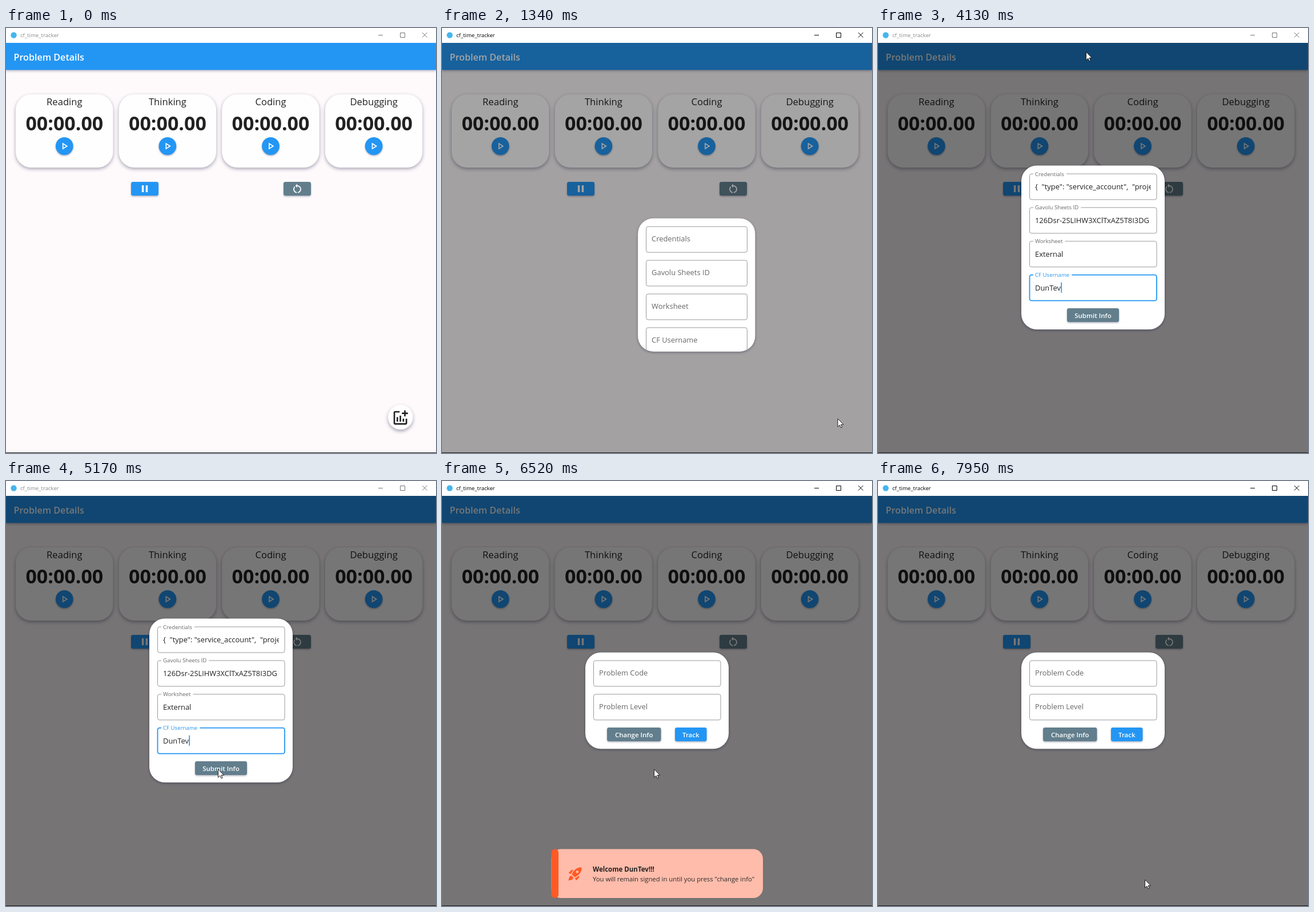
An HTML page with a canvas that plays this animation: 753 by 743 pixels, repeating every 8 s.

```html
<!DOCTYPE html>
<html lang="en">
<head>
<meta charset="utf-8">
<title>cf_time_tracker</title>
<style>
html, body { margin: 0; width: 100%; height: 100%; overflow: hidden; background: #fefafc; }
canvas { display: block; width: 753px; height: 743px; }
</style>
</head>
<body>
<canvas id="stage"></canvas>
<script>
const W = 753, H = 743, LOOP = 8000;
const FONT = '"Open Sans", "Noto Sans", sans-serif';
const BLUE = '#2396f4', SLATE = '#627e8c', ORANGE = '#ff5a26', INK = '#212121';

// Key moments in ms
const T = {
  enter: 430, reach: 950, click: 1140, open: 1190, leave: 1650, atField: 2480,
  filled: 2820, back: 3910, submit: 5340, toast: 5440, swap: 5640,
  toastFade: 6780, flick: 7800
};

const canvas = document.getElementById('stage');
const ctx = canvas.getContext('2d');
const dpr = window.devicePixelRatio || 1;
canvas.width = W * dpr;
canvas.height = H * dpr;

const icons = {
  play: new Path2D('M10 8.64L15.27 12 10 15.36V8.64M8 5v14l11-7L8 5z'),
  pause: new Path2D('M6 19h4V5H6v14zm8-14v14h4V5h-4z'),
  restart: new Path2D('M12 5V2L8 6l4 4V7c3.31 0 6 2.69 6 6 0 2.97-2.17 5.43-5 5.91v2.02c3.95-.49 7-3.85 7-7.93 0-4.42-3.58-8-8-8zm-6 8c0-1.65.67-3.15 1.76-4.24L6.34 7.34C4.9 8.79 4 10.79 4 13c0 4.08 3.05 7.44 7 7.93v-2.02c-2.83-.48-5-2.94-5-5.91z'),
  chart: new Path2D('M22 5v2h-3v3h-2V7h-3V5h3V2h2v3h3zm-3 14H5V5h6V3H5c-1.1 0-2 .9-2 2v14c0 1.1.9 2 2 2h14c1.1 0 2-.9 2-2v-6h-2v6zm-4-6v4h2v-4h-2zm-4 4h2V9h-2v8zm-2 0v-6H7v6h2z'),
  rocket: new Path2D('M9.2 6.35c-2 2.3-3.4 5.6-3.6 5.9L2 10.7l4-4c.5-.5 1.2-.7 1.9-.6zM11.2 17s3.7-1.5 5.9-3.7c5.4-5.4 4.5-9.6 4.2-10.6-.9-.3-5.2-1.2-10.6 4.2C8.5 9.1 7 12.8 7 12.8zm6.4-2.2c-2.3 2-5.6 3.5-5.9 3.6L13.3 22l4-4c.5-.5.7-1.2.6-1.9zM9 18c0 .8-.3 1.6-.9 2.1C6.9 21.3 2 22 2 22s.7-4.9 1.9-6.1A3 3 0 019 18zm4-9a2 2 0 104 0 2 2 0 10-4 0z'),
  arrow: new Path2D('M0 0V17L4 13.2 6.6 19 9.2 17.9 6.6 12.2H12z')
};

const clamp = v => Math.min(1, Math.max(0, v));
const prog = (t, start, dur) => clamp((t - start) / dur);
const lerp = (a, b, k) => a + (b - a) * k;
const mix = (a, b, k) => a.map((v, i) => lerp(v, b[i], k));
const inOut = k => k * k * (3 - 2 * k);

// cubic-bezier(.4, 0, .2, 1)
function standard(x) {
  let lo = 0, hi = 1, s = x;
  for (let i = 0; i < 24; i++) {
    s = (lo + hi) / 2;
    const bx = 1.2 * s * (1 - s) ** 2 + 0.6 * s * s * (1 - s) + s ** 3;
    if (bx < x) lo = s; else hi = s;
  }
  return 3 * s * s * (1 - s) + s ** 3;
}

function text(str, x, y, size, color, weight = 400, align = 'left') {
  ctx.font = `${weight} ${size}px ${FONT}`;
  ctx.textAlign = align;
  ctx.fillStyle = color;
  ctx.fillText(str, x, y);
}

function shadow(dy, blur, alpha) {
  ctx.shadowColor = `rgba(25,25,60,${alpha})`;
  ctx.shadowOffsetY = dy * dpr;
  ctx.shadowBlur = blur * dpr;
}

function noShadow() {
  ctx.shadowColor = 'transparent';
}

function box(x, y, w, h, r, color) {
  ctx.beginPath();
  ctx.roundRect(x, y, w, h, r);
  ctx.fillStyle = color;
  ctx.fill();
}

function disc(x, y, r, color) {
  ctx.beginPath();
  ctx.arc(x, y, r, 0, Math.PI * 2);
  ctx.fillStyle = color;
  ctx.fill();
}

function icon(path, cx, cy, scale, color) {
  ctx.save();
  ctx.translate(cx - 12 * scale, cy - 12 * scale);
  ctx.scale(scale, scale);
  ctx.fillStyle = color;
  ctx.fill(path, 'evenodd');
  ctx.restore();
}

function button(x, y, w, color, label) {
  shadow(1.5, 3, 0.35);
  box(x, y, w, 24, 3.4, color);
  noShadow();
  if (label) text(label, x + w / 2, y + 17.2, 11.5, '#fff', 600, 'center');
}

function titleBar(active) {
  const tint = active ? '#000' : '#8a8a8a';
  ctx.fillStyle = '#fff';
  ctx.fillRect(0, 0, W, 26);
  disc(13.5, 12.5, 5.2, '#45b6ee');
  text('cf_time_tracker', 25, 16.3, 9.6, tint);
  ctx.strokeStyle = active ? '#000' : '#777';
  ctx.lineWidth = 1;
  ctx.beginPath();
  ctx.moveTo(652, 12.5);
  ctx.lineTo(660, 12.5);
  ctx.rect(690.5, 8.5, 8, 8);
  ctx.moveTo(729, 8);
  ctx.lineTo(737.5, 16.5);
  ctx.moveTo(737.5, 8);
  ctx.lineTo(729, 16.5);
  ctx.stroke();
}

function timerCard(name, i) {
  const x = 17 + i * 180.6, cx = x + 85.3;
  shadow(2.5, 6, 0.38);
  box(x, 116, 170.5, 128, 27, '#fffefe');
  noShadow();
  text(name, cx, 135, 16.6, INK, 400, 'center');
  text('00:00.00', cx, 179, 34, INK, 700, 'center');
  shadow(1.5, 3, 0.35);
  disc(cx, 206.5, 15.4, BLUE);
  noShadow();
  icon(icons.play, cx, 206.5, 0.86, '#fff');
}

function page(showFab) {
  ctx.fillStyle = '#fefafc';
  ctx.fillRect(0, 26, W, H - 26);
  shadow(2, 5, 0.4);
  ctx.fillStyle = BLUE;
  ctx.fillRect(0, 26, W, 47.3);
  noShadow();
  text('Problem Details', 13.6, 57, 16.1, '#fff', 600);
  ['Reading', 'Thinking', 'Coding', 'Debugging'].forEach(timerCard);
  button(219, 269, 48, BLUE);
  icon(icons.pause, 243, 281, 0.86, '#fff');
  button(486, 269, 48, SLATE);
  icon(icons.restart, 510, 281, 0.86, '#fff');
  if (showFab) {
    shadow(3, 6, 0.38);
    disc(690.8, 680.3, 21.8, '#fff');
    noShadow();
    icon(icons.chart, 690.6, 681.6, 1.32, INK);
  }
}

// lift: 0 = label inside the field, 1 = label on the border
function field(x, y, w, label, { lift = 0, value = '', focus = false, hover = false, caret = false } = {}) {
  ctx.lineWidth = focus ? 1.8 : 1;
  ctx.strokeStyle = focus ? BLUE : hover ? '#6c6c6c' : '#999';
  ctx.beginPath();
  ctx.roundRect(x + 0.5, y, w - 1, 45, 3.4);
  ctx.stroke();
  const size = 12.9 * (1 - 0.25 * lift);
  ctx.font = `400 12.9px ${FONT}`;
  const gap = (ctx.measureText(label).width * 0.75 + 7) * lift;
  ctx.fillStyle = '#fff';
  ctx.fillRect(x + 7, y - 2, gap, 4);
  text(label, x + 10, y + 26 - 22.5 * lift, size, focus ? BLUE : '#686868');
  if (!value) return;
  ctx.save();
  ctx.beginPath();
  ctx.rect(x + 9, y + 3, w - 19.5, 39);
  ctx.clip();
  text(value, x + 10, y + 27, 12.9, INK);
  if (caret) {
    ctx.fillStyle = BLUE;
    ctx.fillRect(x + 10.5 + ctx.measureText(value).width, y + 13, 1.7, 18);
  }
  ctx.restore();
}

function panel([x, y, w, h], content) {
  ctx.save();
  shadow(1.5, 4, 0.4);
  box(x, y, w, h, Math.min(27, w / 2, h / 2), '#fff');
  noShadow();
  ctx.clip();
  content(x, y, w);
  ctx.restore();
}

const inputs = [
  ['Credentials', '{  "type": "service_account",  "project_id"'],
  ['Gavolu Sheets ID', '126Dsr-2SLIHW3XClTxAZ5T8I3DG'],
  ['Worksheet', 'External'],
  ['CF Username', 'DunTev']
];

function infoPanel(t, pointer) {
  const k = standard(prog(t, T.open, 300));
  const rect = mix([669, 659, 43.5, 43.5], [251, 240.5, 251, 286.5], k);
  const filled = t >= T.filled;
  const caret = (t - 3100) % 1000 < 500 && t >= 3100;
  panel(rect, (x, y, w) => {
    inputs.forEach(([label, value], i) => {
      const fy = y + 14.5 + i * 58.9;
      const focus = filled && i === 3;
      field(x + 14, fy, Math.max(10, w - 27.5), label, {
        lift: filled ? 1 : 0, value: filled ? value : '', focus, caret: focus && caret,
        hover: pointer.beam && pointer.y > fy && pointer.y < fy + 45
      });
    });
    button(x + w / 2 - 45.5, y + 249.5, 91, SLATE, 'Submit Info');
  });
}

function problemPanel(t) {
  const lift = 1 - standard(prog(t, T.swap, 167));
  const fade = 0.28 * clamp((5840 - t) / 110);
  panel([251, 299.8, 251, 168.4], () => {
    field(265, 314, 223.5, 'Problem Code', { lift });
    field(265, 372.8, 223.5, 'Problem Level', { lift });
    button(289, 431, 94.5, SLATE, 'Change Info');
    if (fade > 0) box(289, 431, 94.5, 24, 3.4, `rgba(255,255,255,${fade})`);
    button(408, 431, 55.5, BLUE, 'Track');
  });
}

function toast(t) {
  if (t < T.toast || t > T.toastFade + 170) return;
  const y = 643.5 + 100 * (1 - prog(t, T.toast, 831)) ** 4;
  ctx.save();
  ctx.globalAlpha = 1 - prog(t, T.toastFade, 170);
  box(191.5, y, 370.5, 85.5, 17, '#ffbcab');
  box(191.5, y, 12.5, 85.5, 6, ORANGE);
  icon(icons.rocket, 233.3, y + 43.3, 1.18, ORANGE);
  text('Welcome DunTev!!!', 264, y + 39.7, 11.5, INK, 700);
  text('You will remain signed in until you press "change info"', 264, y + 56, 11.3, '#2a2a2a');
  ctx.restore();
}

// Pointer legs: start, end, from, to
const legs = [
  [T.enter, T.reach, [735, 742], [693, 683]],
  [T.leave, T.atField, [693, 683], [320, 285]],
  [T.back, 4100, [352, -16], [364.5, 42]],
  [4200, 4680, [364.5, 42], [371.5, 512]],
  [5040, 5170, [371.5, 512], [371.5, 504]],
  [T.flick, 7950, [371.5, 504], [467.5, 697]]
];

function pointerAt(t) {
  if (t < T.enter || (t >= T.filled && t < T.back)) return null;
  const leg = legs.filter(l => l[0] <= t).pop();
  const [x, y] = mix(leg[2], leg[3], inOut(prog(t, leg[0], leg[1] - leg[0])));
  const row = (y - 255) % 58.9;
  const beam = t < T.filled && x > 265 && x < 488 && y > 255 && y < 477 && row < 45;
  return { x, y, beam };
}

function drawPointer({ x, y, beam }) {
  ctx.save();
  ctx.translate(x, y);
  if (beam) {
    ctx.strokeStyle = '#111';
    ctx.lineWidth = 1;
    ctx.beginPath();
    ctx.moveTo(-3, -6.5);
    ctx.lineTo(3, -6.5);
    ctx.moveTo(0, -6.5);
    ctx.lineTo(0, 6.5);
    ctx.moveTo(-3, 6.5);
    ctx.lineTo(3, 6.5);
    ctx.stroke();
  } else {
    ctx.scale(0.84, 0.84);
    ctx.fillStyle = '#fff';
    ctx.fill(icons.arrow);
    ctx.strokeStyle = '#111';
    ctx.lineWidth = 1.1;
    ctx.stroke(icons.arrow);
  }
  ctx.restore();
}

function draw(t) {
  ctx.setTransform(dpr, 0, 0, dpr, 0, 0);
  const pointer = pointerAt(t);
  page(t < T.open);
  const dim = 0.535 * (1 - (1 - prog(t, T.open, 300)) ** 1.56);
  ctx.fillStyle = `rgba(0,0,0,${dim})`;
  ctx.fillRect(0, 26, W, H - 26);
  titleBar((t >= T.click && t < T.filled) || t >= T.submit);
  if (t >= T.swap) problemPanel(t);
  else if (t >= T.open) infoPanel(t, pointer || {});
  toast(t);
  ctx.fillStyle = '#1c1c1c';
  ctx.fillRect(0, 742, W, 1);
  if (pointer) drawPointer(pointer);
}

const begin = performance.now();
function tick() {
  draw((performance.now() - begin) % LOOP);
  requestAnimationFrame(tick);
}
tick();
</script>
</body>
</html>
```
